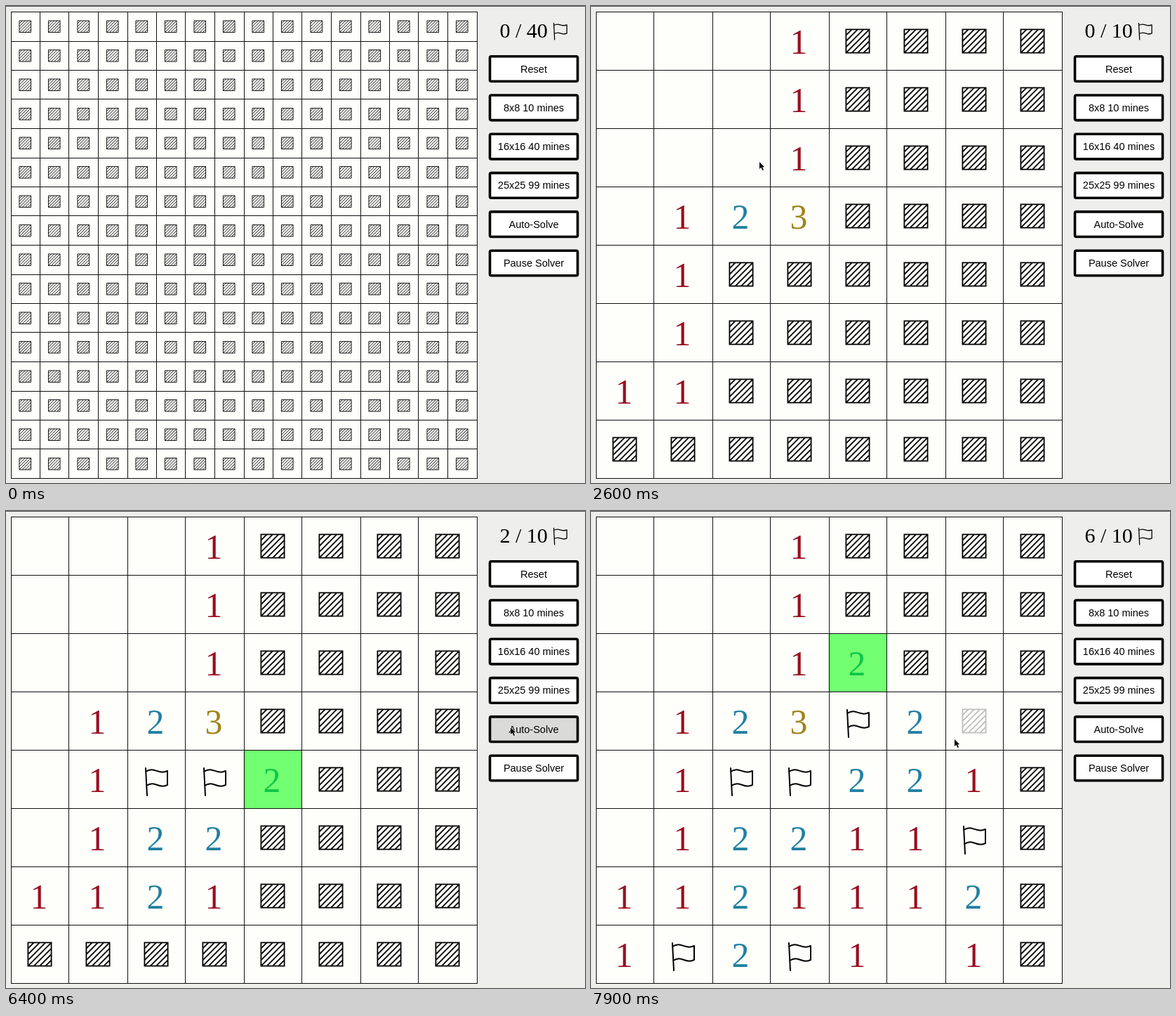
Recreate the animation shown at these times as an HTML page with a canvas. Size 825x679 px, loop 8 s.

```html
<!DOCTYPE html>
<html lang="en">
<head>
<meta charset="utf-8">
<title>Minesweeper solver</title>
<style>
html, body { margin: 0; width: 825px; height: 679px; overflow: hidden; }
canvas { display: block; }
</style>
</head>
<body>
<canvas id="stage" width="825" height="679"></canvas>
<script>
const ctx = document.getElementById('stage').getContext('2d');
const LOOP = 8000, STEP = 100;
const LEFT = 6.5, TOP = 8.5, SIZE = 664;
const RESIZE_AT = 1200, OPEN_AT = 2100, SOLVE_AT = 6200;
const SERIF = '"Liberation Serif", "Times New Roman", serif';
const SANS = '"Liberation Sans", Arial, sans-serif';
const COLORS = { 1: '#980f22', 2: '#2080a2', 3: '#a0841c' };
const BUTTONS = ['Reset', '8x8 10 mines', '16x16 40 mines', '25x25 99 mines', 'Auto-Solve', 'Pause Solver'];

// '#' hidden, '.' empty, 'F' flag
const OPENING = ['...1####', '...1####', '...1####', '.123####', '.1######', '.1######', '11######', '########'];

// [time, cells as row-column-value]; the last cell of a move is the one played
const MOVES = [
  [3100, '42F'], [3900, '43F'], [4300, '522'], [4900, '622'],
  [6200, '532'], [6300, '631'], [6400, '442'], [6500, '541'], [6600, '641'],
  [6700, '452'], [6800, '551'], [6900, '651'], [7000, '701 71F'],
  [7100, '722'], [7200, '73F'], [7400, '741 761 662 75.'], [7500, '56F'],
  [7600, '461'], [7700, '34F'], [7800, '352'], [7900, '242']
];

// pointer: [time, x, y]
const PATH = [
  [500, 822, 258], [600, 822, 258], [1000, 766, 147], [1200, 766, 147], [1400, 767, 148],
  [1500, 767, 148], [2100, 237, 211], [2500, 237, 211], [2600, 240, 222], [2900, 214, 384],
  [3400, 214, 384], [3700, 296, 384], [3900, 296, 384], [4200, 222, 478], [4300, 222, 482],
  [4800, 208, 540], [5000, 208, 540], [5200, 350, 517], [5900, 735, 309], [6000, 733, 310],
  [6100, 733, 310], [6200, 719, 308], [6400, 719, 308], [7000, 527, 323], [7400, 527, 323],
  [7900, 518, 325]
];

function pointerAt(t) {
  if (t < PATH[0][0]) return null;
  const next = PATH.findIndex(p => p[0] > t);
  if (next < 0) return PATH[PATH.length - 1].slice(1);
  const [t0, x0, y0] = PATH[next - 1], [t1, x1, y1] = PATH[next];
  const k = (t - t0) / (t1 - t0);
  return [x0 + (x1 - x0) * k, y0 + (y1 - y0) * k];
}

function boardAt(t) {
  const count = t < RESIZE_AT ? 16 : 8;
  const cells = t < OPEN_AT
    ? Array.from({ length: count }, () => Array(count).fill('#'))
    : OPENING.map(row => [...row]);
  let played = null;
  for (const [time, list] of MOVES) {
    if (time > t) break;
    for (const [row, col, value] of list.split(' ')) {
      cells[row][col] = value;
      if (time >= SOLVE_AT) played = [+row, +col];
    }
  }
  return { count, cells, played };
}

function roundHalfEven(v) {
  return v % 1 === 0.5 ? 2 * Math.round(v / 2) : Math.round(v);
}

// pixel-snapped grid lines
const lineX = d => roundHalfEven(LEFT - 1 + d) + 1.5;
const lineY = d => roundHalfEven(TOP - 0.5 + d) + 0.5;

function text(str, x, y, font, color, align = 'center') {
  ctx.font = font;
  ctx.fillStyle = color;
  ctx.textAlign = align;
  ctx.fillText(str, x, y);
}

function drawTile(cx, cy, cell, faded) {
  const s = cell * 0.4, gap = s / 4, weight = cell / 83;
  ctx.save();
  ctx.translate(cx - s / 2, cy - s / 2);
  ctx.globalAlpha = faded ? 0.25 : 1;
  ctx.strokeStyle = '#000';
  ctx.beginPath();
  ctx.rect(0, 0, s, s);
  for (let k = 1; k < 8; k++) {
    const near = Math.max(0, k * gap - s), far = Math.min(s, k * gap);
    ctx.moveTo(near, far);
    ctx.lineTo(far, near);
  }
  ctx.lineWidth = 1.8 * weight;
  ctx.stroke();
  ctx.restore();
}

function drawFlag(x, y, scale, weight) {
  ctx.save();
  ctx.translate(x, y);
  ctx.scale(scale, scale);
  ctx.beginPath();
  ctx.moveTo(0, 0);
  ctx.lineTo(2, 39);
  ctx.moveTo(0, 5);
  ctx.bezierCurveTo(13, -3, 17, 10, 31, 4);
  ctx.lineTo(31, 24);
  ctx.bezierCurveTo(18, 30, 14, 17, 1, 25);
  ctx.strokeStyle = '#000';
  ctx.lineWidth = weight / scale;
  ctx.lineCap = ctx.lineJoin = 'round';
  ctx.stroke();
  ctx.restore();
}

function drawBoard({ count, cells, played }, pointer) {
  const cell = SIZE / count;
  ctx.fillStyle = '#fefffb';
  ctx.fillRect(LEFT, TOP, SIZE, SIZE);
  cells.forEach((line, row) => line.forEach((value, col) => {
    const x = LEFT + col * cell, y = TOP + row * cell;
    const cx = x + cell / 2, cy = y + cell / 2;
    const hover = pointer && pointer[0] >= x && pointer[0] < x + cell &&
      pointer[1] >= y && pointer[1] < y + cell;
    if (value === '#') drawTile(cx, cy, cell, hover);
    else if (value === 'F') drawFlag(cx - 15, cy - 16, 1, 2);
    else if (value !== '.') text(value, cx - 1, cy + 17.5, `${cell * 0.6}px ${SERIF}`, COLORS[value]);
  }));
  if (played) {
    ctx.fillStyle = 'rgba(0, 255, 0, 0.55)';
    ctx.fillRect(LEFT + played[1] * cell, TOP + played[0] * cell, cell, cell);
  }
  ctx.beginPath();
  for (let i = 0; i <= count; i++) {
    const x = lineX(i * cell), y = lineY(i * cell);
    ctx.moveTo(x, lineY(0) - 0.5);
    ctx.lineTo(x, lineY(SIZE) + 0.5);
    ctx.moveTo(lineX(0) - 0.5, y);
    ctx.lineTo(lineX(SIZE) + 0.5, y);
  }
  ctx.strokeStyle = '#111';
  ctx.lineWidth = 1;
  ctx.stroke();
}

function drawPanel({ count, cells }, pointer) {
  const flags = cells.flat().filter(v => v === 'F').length;
  text(`${flags} / ${count === 16 ? 40 : 10}`, 703.5, 45, `30px ${SERIF}`, '#000', 'left');
  drawFlag(780.5, 24.5, 0.6, 1.3);
  BUTTONS.forEach((label, i) => {
    const x = 689.5, y = 71.7 + i * 55.3, w = 125, h = 35.6;
    const hover = pointer && pointer[0] > x && pointer[0] < x + w &&
      pointer[1] > y && pointer[1] < y + h;
    ctx.beginPath();
    ctx.roundRect(x, y, w, h, 2);
    ctx.fillStyle = hover ? '#dadad8' : '#fff';
    ctx.fill();
    ctx.strokeStyle = '#000';
    ctx.lineWidth = 3.6;
    ctx.stroke();
    text(label, 752, y + 22.8, `14.5px ${SANS}`, '#000');
  });
}

function drawPointer([x, y]) {
  const arrow = new Path2D('M0 0V10L2.4 7.8L4.3 12L6 11.2L4.2 7.2H7.2Z');
  ctx.save();
  ctx.translate(x, y);
  ctx.strokeStyle = '#fff';
  ctx.lineWidth = 1.2;
  ctx.stroke(arrow);
  ctx.fillStyle = '#000';
  ctx.fill(arrow);
  ctx.restore();
}

function render(now) {
  const t = Math.floor((now % LOOP) / STEP) * STEP;
  const board = boardAt(t), pointer = pointerAt(t);
  ctx.fillStyle = '#eeeeec';
  ctx.fillRect(0, 0, 825, 679);
  ctx.fillStyle = '#555';
  ctx.fillRect(0, 0, 825, 1);
  drawBoard(board, pointer);
  drawPanel(board, pointer);
  if (pointer) drawPointer(pointer);
}

const start = performance.now();
function tick() {
  render(performance.now() - start);
  requestAnimationFrame(tick);
}
tick();
</script>
</body>
</html>
```
